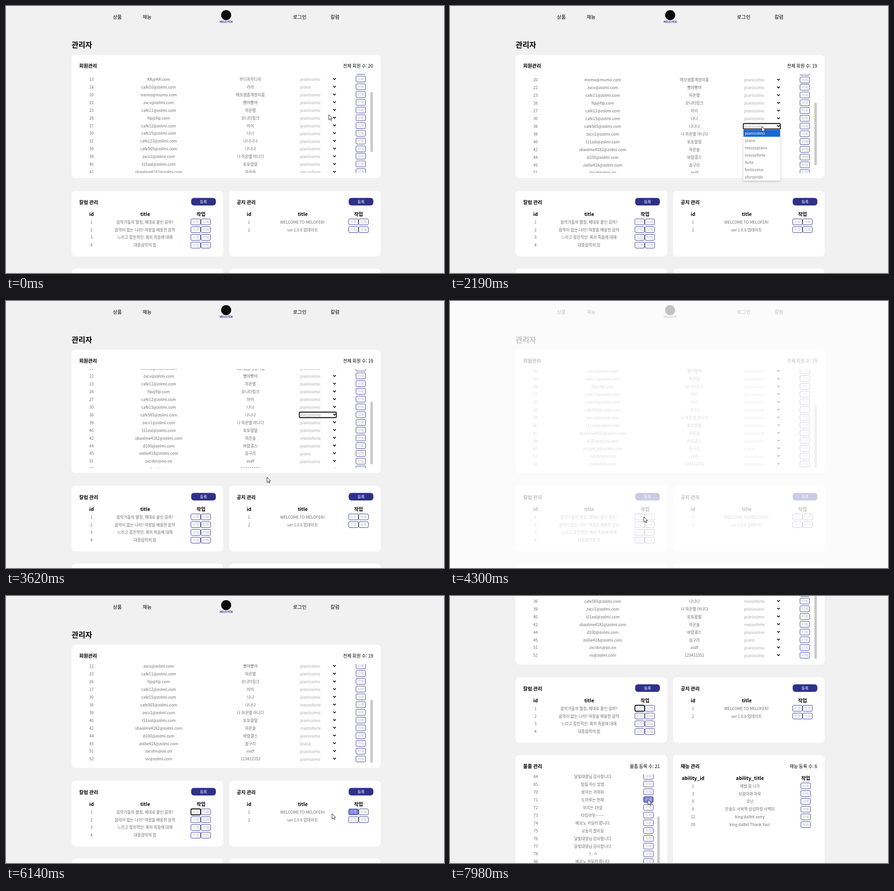
An HTML page with a canvas for the animation above (8000 ms loop, 958 by 585 pixels).

```html
<!DOCTYPE html>
<html lang="ko">
<head>
<meta charset="utf-8">
<style>
  html, body { margin: 0; width: 100%; height: 100%; overflow: hidden; background: #f1f1f1; }
  canvas { display: block; width: 958px; height: 585px; }
</style>
</head>
<body>
<canvas id="stage"></canvas>
<script>
const W = 958, H = 585, LOOP = 8000, PITCH = 16.93;
const FONT = '"Noto Sans CJK KR", "Noto Sans CJK", "Noto Sans", sans-serif';
const NAVY = '#2e3187', BODY = '#6c6c6c', PALE = '#a8a8a8';

const canvas = document.getElementById('stage');
const dpr = window.devicePixelRatio || 1;
canvas.width = W * dpr;
canvas.height = H * dpr;
const ctx = canvas.getContext('2d');

const table = lines => lines.trim().split('\n').map(line => line.trim().split('|'));

const members = table(`
  |||
  13|KK@KK.com|부디꼭부디꼭|pianissimo
  18|cafe10@zolmi.com|라라|piano
  20|memo@mumo.com|메모샘플계정이름|pianissimo
  22|zxcv@zolmi.com|빵야빵야|pianissimo
  23|cafe11@zolmi.com|하온별|pianissimo
  26|fip@fip.com|모니터링크|pianissimo
  27|cafe12@zolmi.com|아이|pianissimo
  30|cafe15@zolmi.com|나나|pianissimo
  31|cafe123@zolmi.com|나나나나|pianissimo
  36|cafe565@zolmi.com|나나나|pianissimo
  39|zxcv1@zolmi.com|나 하온별 아니다|pianissimo
  40|t11zol@zolmi.com|토토랄랄|pianissimo
  42|sbaolme4182@zolmi.com|하온솔|mezzoforte
  44|d100@zolmi.com|바람결스|pianissimo
  45|zollie418@zolmi.com|솜구리|piano
  51|zxcvbn@oo.oo|asdf|pianissimo
  52|vv@zolmi.com|123412352|pianissimo`);

const columns = table(`
  1|음악가들의 별칭, 제대로 붙인 걸까?
  2|음악이 없는 나라? 여왕을 배웅한 음악
  3|느리고 점진적인: 록의 죽음에 대해
  4|대중음악의 힘`);

const notices = table(`
  1|WELCOME TO MELOFEN!
  2|ver 1.0.6 업데이트`);

const products = table(`
  62|수성 19살 읽는 방법
  63|외 채팅 정말 잘돼요!
  64|달빛대왕님 감사합니다
  65|잠을 자는 방법
  70|몽이는 귀여워
  71|도마루는 천재
  72|보리는 19살
  73|타임아웃~~~~
  74|베르노 카일러 팝니다
  75|교동이 팔아요
  76|달빛대왕님 감사합니다
  77|달빛대왕님 감사합니다
  78|ㅓ. ㅇ
  86|베르노 카일러 팝니다`);

const abilities = table(`
  1|제발 좀 나가
  3|보람이와 마루
  5|코난
  8|은솔도 서북쪽 삼십마장 사백리
  12|king dalbit sorry
  26|king dalbit Thank You!`);

const options = ['pianissimo', 'piano', 'mezzopiano', 'mezzoforte', 'forte', 'fortissimo', 'sforzando'];

// Keys are [time, value, ...]; values ease between keys.
const pointer = [
  [60, 706, 238], [520, 773, 261], [750, 773, 261], [1020, 772, 264], [1200, 772, 264],
  [1220, 757, 265], [1500, 752, 266], [1910, 682, 263], [2430, 682, 265], [2590, 681, 318],
  [2900, 681, 318], [2940, 679, 322], [3320, 679, 322], [3990, 424, 473], [4330, 424, 473],
  [4800, 446, 446], [4930, 446, 446], [5170, 468, 467], [5420, 468, 467],
  [5980, 763, 475], [6140, 713, 477], [6230, 687, 480], [6510, 687, 480],
  [7000, 435, 459], [7690, 435, 459], [7960, 433, 446]
];
const memberScroll = [[70, 65], [520, 97.5], [3480, 97.5], [3740, 122.5]];
const productScroll = [[7390, 0], [7570, 26.5]];
const pageScroll = [[6250, 0], [6460, 227]];
const veil = [[4060, 0], [4300, .75], [4400, 1], [5620, 1], [5940, 0]];

function track(keys, t) {
  if (t <= keys[0][0]) return keys[0].slice(1);
  const n = keys.findIndex(k => k[0] > t);
  if (n < 0) return keys[keys.length - 1].slice(1);
  const a = keys[n - 1], b = keys[n];
  const p = (t - a[0]) / (b[0] - a[0]), e = p * p * (3 - 2 * p);
  return a.slice(1).map((v, i) => v + (b[i + 1] - v) * e);
}

const within = (t, from, to) => t >= from && t < to;

function text(s, x, y, size = 8.6, weight = 300, color = BODY, align = 'center') {
  ctx.font = `${weight} ${size}px ${FONT}`;
  ctx.fillStyle = color;
  ctx.textAlign = align;
  ctx.fillText(s, x, y + size * .37);
}
const heading = (s, x, y, align = 'left') => text(s, x, y, 10.65, 700, '#000', align);
const total = (s, x, y) => text(s, x, y, 9.9, 500, '#000', 'right');

function box(x, y, w, h, r, fill, stroke, line = 1) {
  ctx.beginPath();
  ctx.roundRect(x, y, w, h, r);
  if (fill) { ctx.fillStyle = fill; ctx.fill(); }
  if (stroke) { ctx.strokeStyle = stroke; ctx.lineWidth = line; ctx.stroke(); }
}

// Edges sit on whole pixels so the border stays crisp.
function button(label, x, y, state) {
  const left = Math.round(x), top = Math.round(y - 7), hover = state === 'hover';
  box(left + .5, top + .5, 21, 13, 2.5, hover ? '#7b80da' : '#fff', '#3a3d98');
  if (state === 'focus') box(left + .5, top + .5, 21, 13, 2.5, null, '#000', 1.8);
  text(label, left + 11, y + .2, 7.6, 300, hover ? '#d4d6f4' : '#b8b8c0');
}

function pill(x, y) {
  box(x, y, 54, 16.5, 6, NAVY);
  text('등록', x + 27, y + 8.6, 8.5, 400, '#fff');
}

function chevron(x, y) {
  ctx.beginPath();
  ctx.moveTo(x - 2.8, y - 1.6);
  ctx.lineTo(x, y + 1.2);
  ctx.lineTo(x + 2.8, y - 1.6);
  ctx.strokeStyle = '#000';
  ctx.lineWidth = 1.7;
  ctx.stroke();
}

function clipped(x, y, w, h, draw) {
  ctx.save();
  ctx.beginPath();
  ctx.rect(x, y, w, h);
  ctx.clip();
  draw();
  ctx.restore();
}

function header() {
  [['상품', 243.5], ['재능', 308.5], ['로그인', 642.5], ['칼럼', 719.5]]
    .forEach(([s, x]) => text(s, x, 24.5, 10.65, 500, '#000'));
  ctx.beginPath();
  ctx.arc(481.5, 20, 11, 0, Math.PI * 2);
  ctx.fillStyle = '#0b0b0d';
  ctx.fill();
  text('MELO FEN', 481.5, 35, 5.8, 700, NAVY);
  text('관리자', 143.5, 85, 16.3, 700, '#000', 'left');
}

function memberCard(t) {
  const removed = t >= 1560;
  const rows = removed ? members.filter(m => m[0] !== '31') : members;
  const count = removed ? 19 : 20;
  const [scroll] = track(memberScroll, t);
  const view = 216, content = (count + 1) * PITCH;

  box(143.5, 107, 676, 270, 8, '#fff');
  heading('회원관리', 160, 131.5);
  total('전체 회원 수: ' + count, 803, 131.5);
  clipped(144, 149, 675, 217, () => {
    rows.forEach(([id, mail, nick, grade], i) => {
      const y = 149 + PITCH * (i + 3.5) - scroll;
      text(id, 187, y + .6);
      text(mail, 334, y + .6);
      text(nick, 534.5, y + .6);
      if (id === '36' && t >= 3280) grade = 'mezzoforte';
      text(grade, 643.5, y + .7, 8.6, 300, PALE, 'left');
      if (id) chevron(718.5, y - .2);
      if (id === '36' && within(t, 2190, 4050)) {
        box(641.5, Math.round(y - 6.5) + .5, 81, 12, 2, null, '#000', 1.8);
      }
      button('삭제', 765, y, id === '31' && within(t, 480, 1215) ? 'hover' : '');
    });
    box(797, 149 + scroll * view / content, 5.5, view * view / content, 2.7, '#c9c9c9');
  });
}

function postCard(x, title, posts, state) {
  box(x, 405, 331.5, 143.5, 8, '#fff');
  heading(title, x + 16.5, 430);
  pill(x + 261.5, 420.5);
  heading('id', x + 43.5, 456, 'center');
  heading('title', x + 161, 456, 'center');
  heading('작업', x + 283, 456, 'center');
  posts.forEach(([id, name], i) => {
    const y = 473 + i * 16.9;
    text(id, x + 43.5, y + .5);
    text(name, x + 160.5, y + .5);
    button('삭제', x + 282.5, y);
    button('수정', x + 260.5, y, i === 0 ? state : '');
  });
}

function productCard(t) {
  const [scroll] = track(productScroll, t);
  box(143.5, 575.5, 331.5, 300, 8, '#fff');
  heading('물품 관리', 160, 600);
  total('물품 등록 수: 21', 459, 600);
  clipped(144, 618, 331, 230, () => {
    products.forEach(([id, name], i) => {
      const y = 615.1 + i * PITCH - scroll;
      text(id, 187.5, y + .5);
      text(name, 312, y + .5);
      button('삭제', 423, y, id === '71' && t >= 7770 ? 'hover' : '');
    });
    box(453.3, 694 + scroll * .604, 5.3, 140, 2.6, '#c9c9c9');
  });
}

function abilityCard() {
  box(488, 575.5, 331.5, 300, 8, '#fff');
  heading('재능 관리', 504.5, 600);
  total('재능 등록 수: 6', 803, 600);
  heading('ability_id', 531.5, 626, 'center');
  heading('ability_title', 656, 626, 'center');
  heading('작업', 778, 626, 'center');
  abilities.forEach(([id, name], i) => {
    const y = 643 + i * 16.9;
    text(id, 531.5, y + .5);
    text(name, 656, y + .5);
    button('삭제', 767, y);
  });
}

function dropdown(t) {
  const active = t < 2460 ? 0 : t < 2530 ? 1 : t < 2590 ? 2 : 3;
  ctx.save();
  ctx.shadowColor = 'rgba(0,0,0,.25)';
  ctx.shadowBlur = 5;
  ctx.shadowOffsetY = 1;
  box(641.5, 270.5, 81, 112, 1, '#fff');
  ctx.restore();
  options.forEach((name, i) => {
    const on = i === active;
    if (on) box(642, 271 + i * 16, 80, 15.5, 0, '#1967d2');
    text(name, 645, 279 + i * 16, 8.6, 300, on ? '#fff' : '#777', 'left');
  });
}

function arrow(x, y) {
  ctx.beginPath();
  [[0, 0], [0, 11.6], [2.7, 9.2], [4.5, 13], [6.3, 12.2], [4.6, 8.5], [8, 8.2]]
    .forEach(([dx, dy]) => ctx.lineTo(x + dx, y + dy));
  ctx.closePath();
  ctx.fillStyle = '#fff';
  ctx.fill();
  ctx.strokeStyle = '#222';
  ctx.lineWidth = 1;
  ctx.stroke();
}

function beam(x, y) {
  ctx.beginPath();
  ctx.moveTo(x - 2.5, y - 5.5);
  ctx.lineTo(x + 2.5, y - 5.5);
  ctx.moveTo(x, y - 5.5);
  ctx.lineTo(x, y + 5.5);
  ctx.moveTo(x - 2.5, y + 5.5);
  ctx.lineTo(x + 2.5, y + 5.5);
  ctx.strokeStyle = '#222';
  ctx.lineWidth = 1.1;
  ctx.stroke();
}

function render(t) {
  ctx.setTransform(dpr, 0, 0, dpr, 0, 0);
  ctx.fillStyle = '#f1f1f1';
  ctx.fillRect(0, 0, W, H);

  ctx.save();
  ctx.translate(0, -track(pageScroll, t)[0]);
  header();
  memberCard(t);
  postCard(143.5, '칼럼 관리', columns, t >= 4400 ? 'focus' : within(t, 3960, 4080) ? 'hover' : '');
  postCard(488, '공지 관리', notices, within(t, 5980, 6200) ? 'hover' : '');
  productCard(t);
  abilityCard();
  ctx.restore();

  if (within(t, 2190, 3080)) dropdown(t);

  ctx.fillStyle = `rgba(255,255,255,${track(veil, t)[0]})`;
  ctx.fillRect(0, 0, W, H);

  const [x, y] = track(pointer, t);
  if (within(t, 6400, 6560)) beam(x, y + 6);
  else arrow(x, y);
}

const start = performance.now();
(function frame() {
  render((performance.now() - start) % LOOP);
  requestAnimationFrame(frame);
})();
</script>
</body>
</html>
```
